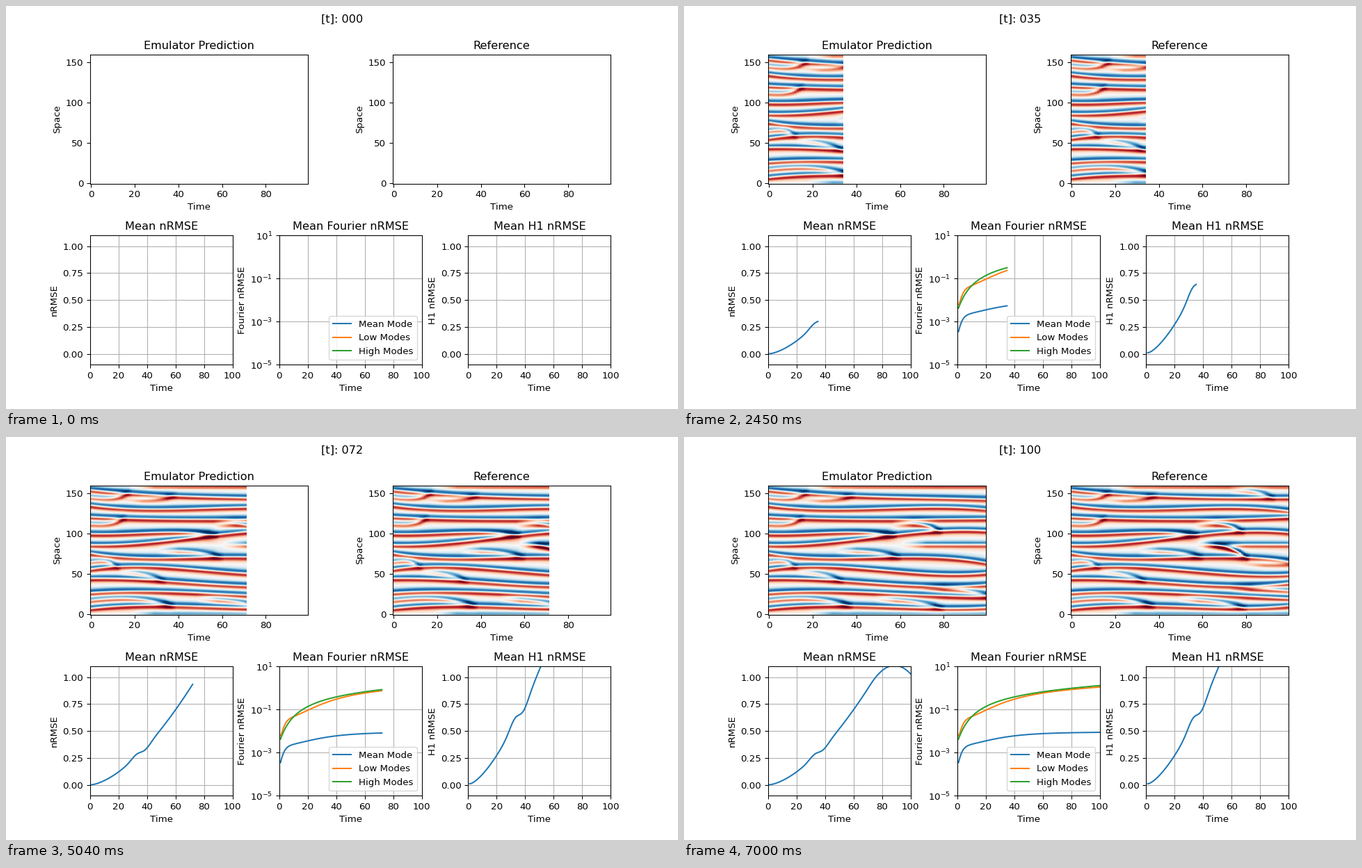
A matplotlib script that plays this animation: 966x580 px, repeating every 7070 ms.

```python
import numpy as np
import matplotlib.pyplot as plt
from matplotlib.animation import FuncAnimation

W, H, DPI = 966, 580, 96.6
STEPS, CELLS = 100, 160

# Long-lived fronts (red below, blue above): places at the key times
KEYS = (0, 25, 60, 100)
FRONTS = {
    "a": (153.5, 148, 144.5, 142),
    "b": (134.5, 130, 131.7, 129.5),
    "c": (120.5, 118, 117.3, 118),
    "d": (86, 88.5, 99, 103),
    "e": (75.5, 70, 71, 63.5),
    "f": (56, 59.5, 53, 51.5),
    "g": (44.5, 43, 37, 37),
    "h": (27, 28.8, 25.5, 22),
    "i": (7.5, 11.3, 9.2, 9),
}
# Side fronts that close in on a host: host, birth, merge time, first gap
MERGES = [
    ("a", 0, 17, -9), ("a", 14, 38, -7), ("c", 0, 15, -9), ("d", 0, 57, 13.5),
    ("d", 56, 78, 12), ("e", 30, 59, 9), ("f", 0, 12, 9), ("g", 12, 33, 8),
    ("i", 0, 37, 10), ("i", 48, 79, 9),
]
MERGES_PRED = [("h", 70, 103, 9)]
MERGES_REF = [("a", 72, 92, 9), ("e", 57, 80, 15), ("e", 78, 104, -7),
              ("h", 72, 140, 10)]
# Fronts born in a wide gap: birth, place
BIRTHS = [(17, -1), (60, 86)]


def front(center, strength):
    """Steep step from red to blue with a faint wide halo."""
    space = np.arange(CELLS)[:, None]
    d = (space - center + CELLS / 2) % CELLS - CELLS / 2

    def lobe(w):
        return -d / w * np.exp(0.5 - d * d / (2 * w * w))

    return strength * (0.84 * lobe(2.2) + 0.22 * lobe(5.2))


def field(merges, drift):
    """Space-time picture; drift pushes late fronts up and down in turn."""
    t = np.arange(STEPS)
    late = np.clip((t - 60) / 40, 0, 1) ** 2
    u = np.zeros((CELLS, STEPS))
    path = {}
    for k, (name, places) in enumerate(FRONTS.items()):
        cubic = np.polyfit(KEYS, places, 3)
        path[name] = np.polyval(cubic, t) + drift * (-1) ** k * late
        u += front(path[name], 0.8)
    for host, t0, t1, gap in MERGES + merges:
        s = np.clip((t - t0) / (t1 - t0), 0, 1)
        rise = np.clip((t - t0) / 10, 0, 1) if t0 else 1
        fall = np.clip((t1 + 2 - t) / 5, 0, 1)
        u += front(path[host] + gap * (1 - s ** 3), abs(gap) / 16 * rise * fall)
    for t0, place in BIRTHS:
        u += front(place, 0.65 * np.clip((t - t0) / 12, 0, 1))
    return u


def wobble(t):
    d = (t - 35.7) / 4
    return -d * np.exp(0.5 - d * d / 2)


def decades(t, a, b, c, ripple, k):
    """Error that grows as a bent power law with a slow ripple."""
    x = np.log10(t)
    return 10 ** (a + b * x + c * x * x + ripple * np.sin(k * np.pi * (x - 1)))


fig = plt.figure(figsize=(W / DPI, H / DPI), dpi=DPI)
header = fig.suptitle("[t]: 000")
grid = fig.add_gridspec(2, 14, hspace=0.4, wspace=0.3)


def panel(spec, title, ylabel):
    ax = fig.add_subplot(spec)
    ax.set_title(title)
    ax.set_xlabel("Time")
    ax.set_ylabel(ylabel)
    return ax


def heatmap(spec, title, data):
    ax = panel(spec, title, "Space")
    img = ax.imshow(np.full(data.shape, np.nan), cmap="RdBu_r", vmin=-1,
                    vmax=1, origin="lower", aspect="auto")
    ax.set_xticks(range(0, 100, 20))
    ax.set_yticks(range(0, 151, 50))
    return img, data


def chart(spec, title, ylabel):
    ax = panel(spec, title, ylabel)
    ax.set_xlim(0, 100)
    ax.set_xticks(range(0, 101, 20))
    ax.set_ylim(-0.1, 1.1)
    ax.set_yticks(np.linspace(0, 1, 5))
    ax.grid(True)
    return ax


maps = [
    heatmap(grid[0, :6], "Emulator Prediction", field(MERGES_PRED, 0)),
    heatmap(grid[0, 8:], "Reference", field(MERGES_REF, 2)),
]

ax_err = chart(grid[1, :4], "Mean nRMSE", "nRMSE")
ax_four = chart(grid[1, 5:9], "Mean Fourier nRMSE", "Fourier nRMSE")
ax_h1 = chart(grid[1, 10:], "Mean H1 nRMSE", "H1 nRMSE")
ax_four.set_yscale("log")
ax_four.set_ylim(1e-5, 1e1)
ax_four.set_yticks([1e-5, 1e-3, 1e-1, 1e1])
ax_four.minorticks_off()

steps = np.arange(1, STEPS + 1)
slowdown = 0.0007 * np.clip(steps - 72, 0, None) ** 2
nrmse = 0.735 * (steps / 62) ** 1.6 + 0.022 * wobble(steps) - slowdown
h1 = 0.36 * (steps / 24) ** 1.486 + 0.05 * wobble(steps) + 0.008 / steps
curves = [
    (ax_err, nrmse, None),
    (ax_h1, h1, None),
    (ax_four, decades(steps, -3.46, 0.98, -0.14, -0.04, 2), "Mean Mode"),
    (ax_four, decades(steps, -2.22, 0.64, 0.245, -0.07, 2), "Low Modes"),
    (ax_four, decades(steps, -2.37, 0.80, 0.22, 0.11, 1), "High Modes"),
]
lines = [(ax.plot([], [], label=label)[0], values)
         for ax, values, label in curves]
ax_four.legend(loc="lower right")


def update(n):
    header.set_text(f"[t]: {n:03d}")
    for img, data in maps:
        shown = data.copy()
        shown[:, n:] = np.nan
        img.set_data(shown)
    for line, values in lines:
        line.set_data(steps[:n], values[:n])
    return [header]


anim = FuncAnimation(fig, update, frames=STEPS + 1, interval=70,
                     init_func=lambda: update(0), repeat=True, repeat_delay=0)
plt.show()
```
